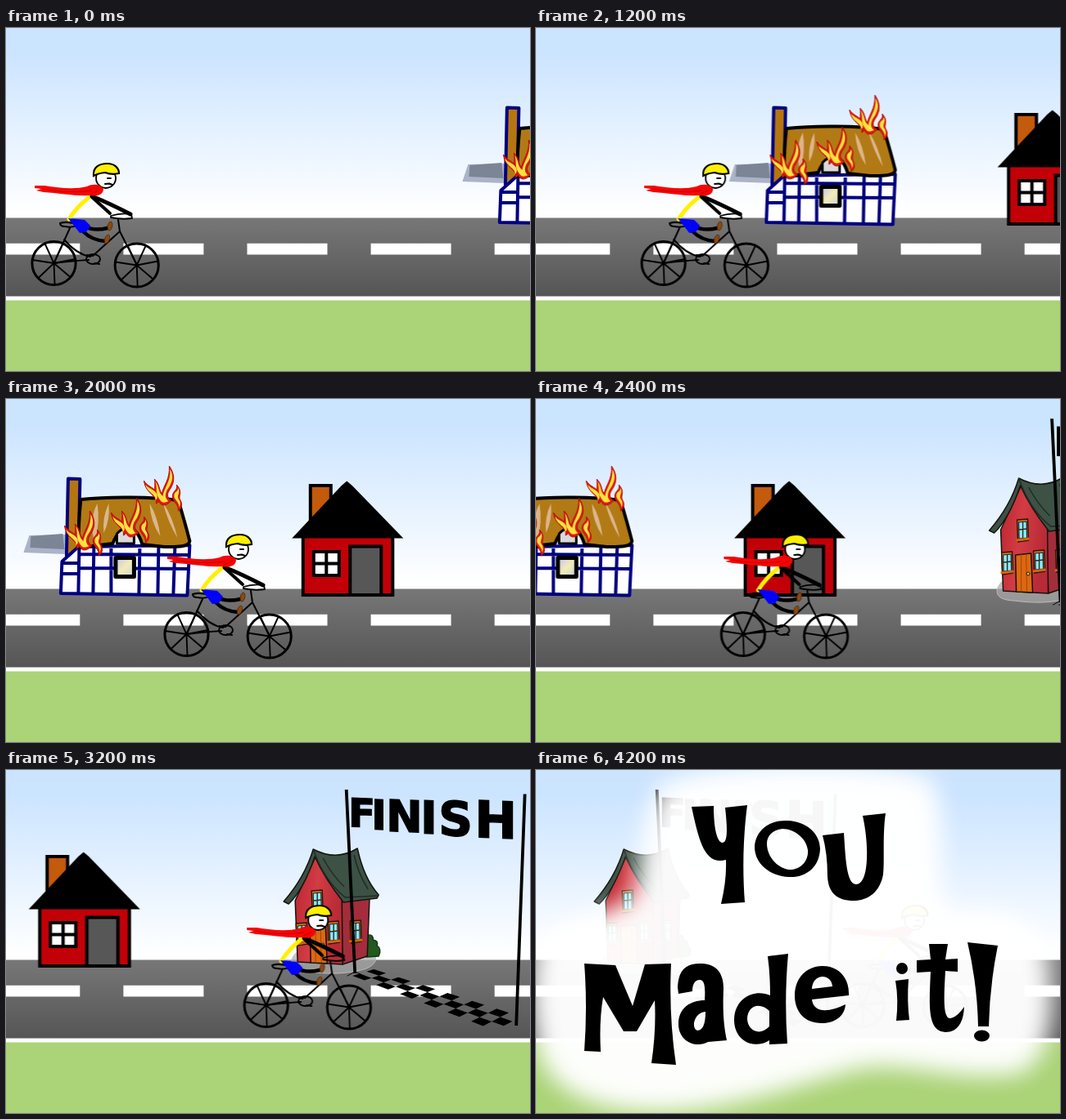
An HTML page that plays this animation: 640x420 px, repeating every 8 s.

```html
<!DOCTYPE html>
<html lang="en">
<head>
<meta charset="utf-8">
<title>Bike ride to the finish</title>
<style>
  html, body { margin: 0; width: 100%; height: 100%; overflow: hidden; }
  svg { display: block; width: 640px; height: 420px; }
  .world, .rider { animation: 8s infinite steps(21, end); }
  .world { animation-name: scroll; }
  .rider { animation-name: ride; }
  .ending { opacity: 0; animation: show 8s infinite step-end; }
  @keyframes scroll { 52.5%, 100% { transform: translateX(-1125.6px); } }
  @keyframes ride { 52.5%, 100% { transform: translateX(340.2px); } }
  @keyframes show { 0% { opacity: 0; } 52.5%, 100% { opacity: 1; } }
  .line { fill: none; stroke: #000; stroke-linecap: round; stroke-linejoin: round; }
  .finish { font: bold 48px "DejaVu Sans", sans-serif; stroke: #000; stroke-width: 1.5; }
</style>
</head>
<body>
<svg viewBox="0 0 640 420">
  <defs>
    <linearGradient id="sky" x2="0" y2="1">
      <stop offset=".12" stop-color="#cbe4ff"/>
      <stop offset=".97" stop-color="#fff"/>
    </linearGradient>
    <linearGradient id="road" x2="0" y2="1">
      <stop stop-color="#777"/>
      <stop offset="1" stop-color="#555"/>
    </linearGradient>
    <linearGradient id="glass" x2="1" y2="1">
      <stop offset=".2" stop-color="#d4d4dc"/>
      <stop offset=".5" stop-color="#f3ecb4"/>
      <stop offset=".9" stop-color="#d4d4dc"/>
    </linearGradient>
    <linearGradient id="brick" x2="1" y2=".3">
      <stop stop-color="#b8242e"/>
      <stop offset=".5" stop-color="#d23c44"/>
      <stop offset="1" stop-color="#b82a35"/>
    </linearGradient>
    <filter id="soft" x="-20%" y="-20%" width="140%" height="140%">
      <feGaussianBlur stdDeviation="14"/>
    </filter>
    <g id="wheel" class="line">
      <circle r="26.6" stroke-width="3"/>
      <path d="M0,0L-11,-24M0,0L11,-24M0,0L26,-5M0,0L20,17M0,0L1,26M0,0L-19,18M0,0L-26,-4" stroke-width="1.9"/>
      <circle r="1.8" fill="#000"/>
    </g>
    <g id="flame" stroke-linejoin="round">
      <g fill="#e01b10" stroke="#b80d0d">
        <path d="M16,47C18,36 3,36 1,19C6,27 14,27 18,35C21,42 19,46 16,47Z"/>
        <path d="M22,48C10,34 16,30 14,17C21,24 19,30 23,35C25,24 33,18 32,1C41,14 37,24 32,31C28,37 31,42 35,43C30,49 25,50 22,48Z"/>
        <path d="M43,56C44,48 36,45 36,38C36,31 43,31 41,24C49,33 43,37 45,42C49,48 47,53 43,56Z"/>
      </g>
      <g fill="#ffe23f">
        <path d="M15,43C17,36 5,34 3,24C8,30 14,29 17,36C18,40 17,42 15,43Z"/>
        <path d="M21,43C14,34 18,29 15,20C20,26 18,33 24,38C26,27 34,20 33,5C39,15 34,24 29,31C26,38 28,42 31,44C27,46 24,47 21,43Z"/>
        <path d="M44,52C45,45 37,42 38,37C38,32 43,33 43,28C46,34 41,37 43,41C46,45 46,48 44,52Z"/>
      </g>
    </g>
    <g id="pane" stroke-linejoin="round">
      <path d="M-7,-13L6,-14L7,12L-6,14Z" fill="#e07012" stroke="#2a1408" stroke-width="1.4"/>
      <path d="M-5,-10L4.500,-11L5,9L-4.500,10Z" fill="#8ceafa" stroke="#142a30" stroke-width="1.2"/>
      <path d="M0,-10V10M-5,-1L5,-2" stroke="#2a2a20" stroke-width="1.4"/>
      <path d="M-8,12L8,10" stroke="#d5640c" stroke-width="3"/>
    </g>
  </defs>

  <rect width="640" height="234" fill="url(#sky)"/>
  <rect y="232.500" width="640" height="97" fill="url(#road)"/>
  <path d="M-7.700,270.600H640" stroke="#fff" stroke-width="13.600" stroke-dasharray="98 53.100"/>
  <rect y="328.500" width="640" height="5.500" fill="#fff"/>
  <rect y="333.500" width="640" height="87" fill="#abd377"/>

  <g class="world">
    <!-- burning house -->
    <g transform="translate(214.4)" stroke-linejoin="round">
      <path d="M343,188L350,167L395,166V190Z" fill="#aab3c8"/>
      <path d="M352,168L391,165L393,184L351,182Z" fill="#7b8595"/>
      <path d="M397.500,97.500L412,98L410,190L395.500,192Z" fill="#b5760f" stroke="#000080" stroke-width="4"/>
      <path d="M388.500,238L390,199L410,181L546,179L543,240.500Z" fill="#fff" stroke="#000080" stroke-width="4"/>
      <path d="M390,201L411,201M390,214H411M411,183L410,238M411,190L545,191M411,207L545,208M429,180L428,238M450,183V238M485,183L484,238M508,180L507,239M528,180L526,239" fill="none" stroke="#000080" stroke-width="4"/>
      <path d="M413,123C450,119 500,120 532,124Q541,154 546,174C545,182 527,181 515,181L488,178C480,151 461,152 452,177L410,182Q410,150 413,123Z" fill="#b17a15" stroke="#000" stroke-width="4"/>
      <path d="M433,128Q422,150 430,175Q437,150 433,128ZM447,128Q439,145 441,164Q449,148 447,128ZM497,128Q498,150 510,168Q507,144 497,128ZM513,126Q519,150 531,170Q525,144 513,126Z" fill="#dcb58a"/>
      <path d="M457,177V165Q467,154 478,163V177Z" fill="#d9d9dc" stroke="#000" stroke-width="3"/>
      <rect x="455.500" y="194.500" width="22.500" height="23" fill="url(#glass)" stroke="#000" stroke-width="5"/>
      <use href="#flame" x="392" y="136"/>
      <use href="#flame" x="449" y="120"/>
      <use href="#flame" x="489" y="81"/>
    </g>

    <!-- red house -->
    <g transform="translate(428.8)" stroke="#000" stroke-width="4">
      <rect x="479" y="106" width="25" height="44" fill="#c45a0b"/>
      <rect x="470" y="164" width="109.500" height="76" fill="#c10008"/>
      <path d="M456.500,170.500L517,106L523.500,100.500L530,106L592.500,170.500Z" stroke="none"/>
      <rect x="483" y="187" width="31" height="29" fill="#fff"/>
      <path d="M498.500,187V216M483,201.500H514"/>
      <rect x="527.500" y="180.500" width="38" height="59.500" fill="#575757"/>
    </g>

    <!-- cottage -->
    <g transform="translate(964.8)" stroke="#14140f" stroke-width="1.500" stroke-linejoin="round">
      <path d="M247,224C238,234 238,246 262,247C288,250 300,250 322,246C340,243 348,234 343,226Z" fill="#aaa" fill-opacity=".7" stroke="#bbb" stroke-width="1"/>
      <path d="M334,202Q342,201 341,208Q348,209 346,215Q352,219 348,228L333,229Z" fill="#22591f" stroke="#123812"/>
      <path d="M302,156L337,152L334,228L304,238Z" fill="#a32d3b"/>
      <path d="M271,106L246,160L249,235L304,238L303,156Z" fill="url(#brick)"/>
      <path d="M268,97C287,107 306,106 322,96Q330,133 348,153L346,157L305,162Q282,133 270,106Q256,147 238,164L232,161Q258,131 268,97Z" fill="#3d5145"/>
      <path d="M268,97Q281,135 307,156L347,154M280,108Q292,130 306,143M318,104Q322,125 335,146" fill="none" stroke="#1e2c25"/>
      <use href="#pane" x="273" y="161"/>
      <use href="#pane" x="254" y="201"/>
      <use href="#pane" x="293" y="199"/>
      <use href="#pane" x="320" y="198"/>
      <path d="M264,191L283,189L285,237L265,236Z" fill="#dc6811"/>
      <path d="M271,190V236M277,190L278,236" stroke="#a3470a" stroke-width="1"/>
      <circle cx="279.500" cy="214" r="2" fill="#ffbf4d" stroke-width="1"/>
    </g>

    <!-- finish line -->
    <g transform="translate(964.8)">
      <path id="checks"/>
      <path d="M308.500,24L319,249M526.500,29.500L516,313" stroke="#000" stroke-width="3.800"/>
      <path d="M310,252L319,247L326,250" class="line" stroke-width="1"/>
      <g class="finish" transform="translate(312 69) skewY(2.4)">
        <text x="-1" y="0">F<tspan x="27" y="2" font-size="50">I</tspan><tspan x="45" y="3.500" font-size="53">N</tspan><tspan x="87" y="4.500" font-size="55">I</tspan><tspan x="109" y="6" font-size="58">S</tspan><tspan x="153" y="6.500" font-size="62">H</tspan></text>
      </g>
    </g>
  </g>

  <g class="rider">
    <use href="#wheel" x="58.500" y="288"/>
    <use href="#wheel" x="159.700" y="290.500"/>
    <g class="line" stroke-width="2">
      <path d="M58.500,288L78,245M71,259Q86,277 103,280M59,288Q83,285 101,284M106,279L139,249M137,235L139,249Q148,267 160,290"/>
      <ellipse cx="106.500" cy="283" rx="8.500" ry="6"/>
      <path d="M99,278L105,279M108,288L114,289"/>
      <path d="M66,239Q76,236 88,241Q81,245 72,243Q66,243 66,239Z"/>
      <path d="M128,230Q140,226 153,228L154,233Q142,235 128,232Z" stroke-width="1.800"/>
    </g>
    <path d="M103,206Q86,219 77,234" class="line" style="stroke:#fff000" stroke-width="5"/>
    <g class="line" stroke-width="5">
      <path d="M105,206Q127,215 152,228"/>
      <path d="M105,207L127,227" stroke-width="4"/>
      <path d="M96,243Q108,249 124,245" stroke-width="4.500"/>
      <path d="M94,249Q105,260 121,261" stroke-width="4.500"/>
    </g>
    <path d="M76,233L96,235L103,242L98,250L90,251Z" fill="#0000ff"/>
    <g fill="#8b4a12" stroke="#4a2508" stroke-width=".7">
      <ellipse cx="127" cy="242.500" rx="2.800" ry="5.500" transform="rotate(12 127 242.500)"/>
      <ellipse cx="123.500" cy="258.500" rx="2.800" ry="5.500" transform="rotate(20 123.500 258.500)"/>
    </g>
    <circle cx="122" cy="184" r="12" fill="#fff" stroke="#000" stroke-width="1.800"/>
    <path d="M107,181C106,170 114,166 124,166C132,166 138,171 138,178Q129,180 121,177Q112,178 107,181Z" fill="#ffef00" stroke="#000" stroke-width="2.200"/>
    <path d="M124,184H128M121,191L126,190.500L130,192" class="line" stroke-width="2"/>
    <path d="M35,193L47,193C65,196 84,198 99,194C107,190 116,192 119,197C119,204 111,207 103,205C84,206 64,202 46,201L37,199L43,197L35,196Z" fill="#f50505"/>
    <path d="M45,197Q75,203 105,199M104,203L115,198" fill="none" stroke="#c00" stroke-width="1"/>
  </g>

  <g class="ending" role="img" aria-label="You Made it!">
    <path d="M150,20C200,-14 420,-14 480,10C512,50 478,150 508,174C566,166 612,180 624,224C636,300 630,350 592,372C500,384 440,350 380,370C320,386 250,412 170,418C70,422 14,392 2,340C-8,300 -8,250 4,210C20,176 76,186 118,156C132,110 126,60 150,20Z" fill="#fff" filter="url(#soft)" opacity=".97"/>
    <g fill-rule="evenodd">
      <path d="M190,45L217,44C217,66 220,89 228,89C234,89 234,72 231,46L258,43C253,82 252,122 255,162L226,164Q233,135 232,110C206,117 199,87 190,45Z"/>
      <path d="M267,94C268,74 285,61 307,62C331,63 347,78 347,97C346,118 331,132 309,131C286,130 267,115 267,94ZM282,90C282,108 298,123 313,122C326,120 333,109 332,98C330,83 315,72 301,72C289,73 282,81 282,90Z"/>
      <path d="M350,80L376,77C378,106 379,140 391,140C407,140 407,92 399,56L427,53C423,80 426,112 424,128C420,150 405,160 388,160C367,160 357,150 356,130Q356,102 350,80Z"/>
      <path d="M59,237L97,239L118,289L133,238L165,237Q162,301 171,361L141,359Q147,318 145,282L123,320H107L82,278Q77,307 79,345L59,344Q63,290 59,237Z"/>
      <path d="M173,266C174,244 184,237 200,237C222,237 229,250 229,268C228,295 229,312 233,331L210,333C196,341 174,333 174,311C174,291 189,282 206,282C207,266 206,257 200,257C193,257 191,264 191,271L174,274ZM207,296C193,297 189,316 197,319C205,319 207,308 207,296Z"/>
      <path d="M283,228L308,225Q303,280 307,335L285,336V331C266,343 242,332 242,306C242,280 266,267 286,276Q286,250 283,228ZM285,295C273,283 258,289 258,305C259,320 274,326 285,314Z"/>
      <path d="M382,276L337,281C339,298 358,297 378,287C377,303 363,310 349,310C328,310 316,296 316,276C316,254 331,240 350,240C370,240 383,255 382,276ZM337,268L362,265C361,249 338,248 337,268Z"/>
      <circle cx="447" cy="243" r="7"/>
      <path d="M439,258L455,256Q453,283 456,306L440,307Q443,281 439,258Z"/>
      <path d="M480,213L503,213L500,232L515,231V247L500,246C498,280 497,304 506,304Q514,303 523,290C522,312 513,321 500,321C478,320 480,290 482,247L465,248V233L482,232Z"/>
      <path d="M527,211L564,215Q554,265 553,314H540Q539,262 527,211Z"/>
      <ellipse cx="544.500" cy="325.500" rx="9.500" ry="7"/>
    </g>
  </g>
</svg>
<script>
  // Checkered strip, blended between its far and near edges.
  const rows = 12, cols = 3;
  const mix = (a, b, k) => a + (b - a) * k;
  const point = (row, col) => {
    const u = row / rows, v = col / cols;
    const x = mix(mix(316, 490, u), mix(342, 522, u), v);
    const y = mix(mix(252, 319, u), mix(244, 302, u), v);
    return x.toFixed(1) + ',' + y.toFixed(1);
  };
  let d = '';
  for (let r = 0; r < rows; r++) {
    for (let c = r % 2; c < cols; c += 2) {
      d += `M${point(r, c)}L${point(r + 1, c)}L${point(r + 1, c + 1)}L${point(r, c + 1)}Z`;
    }
  }
  document.getElementById('checks').setAttribute('d', d);
</script>
</body>
</html>
```
